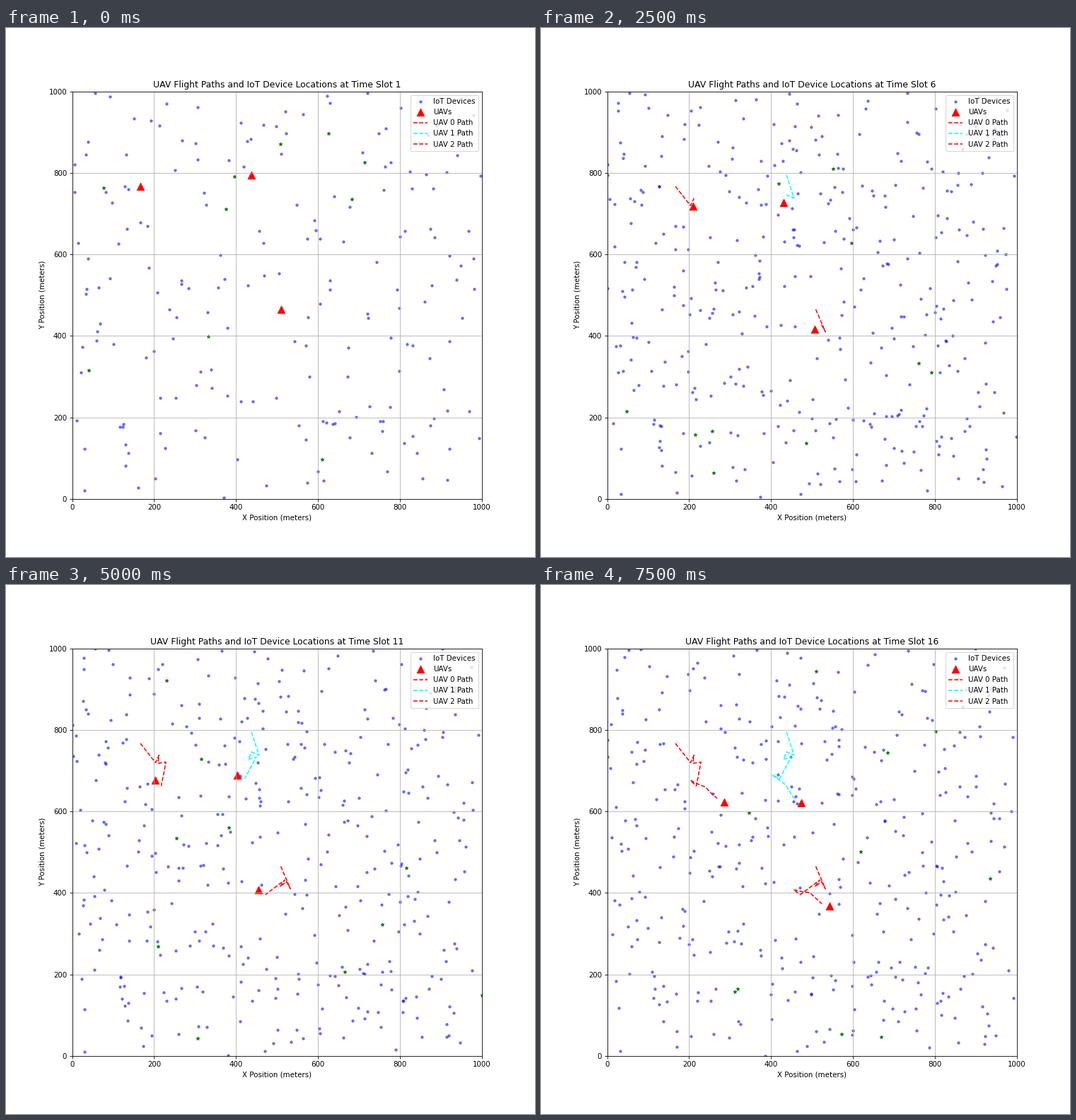
A matplotlib script that plays this animation: 748x748 px, repeating every 8 s.

```python
import numpy as np
import matplotlib.pyplot as plt
from matplotlib.animation import FuncAnimation

SLOTS = 16
AREA = 1000
FIRST, TOTAL, ACTIVE = 200, 380, 10
FLIGHT, DRIFT = 20, 5  # meters per slot: UAV step, largest device drift

# Start point, path colour and heading in degrees for each step
UAVS = [
    ((166.5, 767), "red", [-52] * 3 + [65, -98, 9] + [-101] * 3
     + [135, -27, -22, -47, -41, -27]),
    ((437.5, 795), "cyan", [-72] * 3 + [156, -113, 17] + [-118] * 3
     + [155, -34, -38, -58, -58, -33]),
    ((509, 465), "red", [-67] * 3 + [118, -143, 54] + [-143] * 3
     + [142, -13, -8, -43, -43, -14]),
]


def fly(start, headings):
    """Positions at each slot when flying equal steps along the headings."""
    angle = np.radians(headings)
    steps = FLIGHT * np.column_stack([np.cos(angle), np.sin(angle)])
    return np.cumsum(np.vstack([start, steps]), axis=0)


def walk_devices(rng):
    """Random walk of every device, kept inside the area."""
    pos = rng.uniform(0, AREA, (TOTAL, 2))
    walk = [pos]
    for _ in range(SLOTS - 1):
        pos = np.clip(pos + rng.uniform(-DRIFT, DRIFT, pos.shape), 0, AREA)
        walk.append(pos)
    return np.array(walk)


rng = np.random.default_rng(7)
paths = np.array([fly(start, headings) for start, _, headings in UAVS])
devices = walk_devices(rng)
counts = [FIRST] + [TOTAL] * (SLOTS - 1)
picks = [rng.choice(n, ACTIVE, replace=False) for n in counts]

plt.rcParams["font.size"] = 9.9
fig, ax = plt.subplots(figsize=(10, 10), dpi=74.8)
dots = ax.scatter([], [], s=10, c="blue", alpha=0.5, label="IoT Devices")
stars = ax.scatter([], [], s=20, c="green", marker="*")
uavs = ax.scatter([], [], s=100, c="red", marker="^", label="UAVs")
lines = [ax.plot([], [], "--", color=color, label=f"UAV {k} Path")[0]
         for k, (_, color, _) in enumerate(UAVS)]

ax.set(xlim=(0, AREA), ylim=(0, AREA),
       xlabel="X Position (meters)", ylabel="Y Position (meters)")
title = ax.set_title("")
ax.grid(True)
ax.legend(loc="upper right")


def update(slot):
    pos, active = devices[slot, :counts[slot]], picks[slot]
    dots.set_offsets(np.delete(pos, active, axis=0))
    stars.set_offsets(pos[active])
    uavs.set_offsets(paths[:, slot])
    for line, path in zip(lines, paths):
        line.set_data(*path[:slot].T)
    title.set_text(f"UAV Flight Paths and IoT Device Locations at Time Slot {slot + 1}")
    return [dots, stars, uavs, title, *lines]


anim = FuncAnimation(fig, update, frames=SLOTS, interval=500, repeat=True, repeat_delay=0)
plt.show()
```
